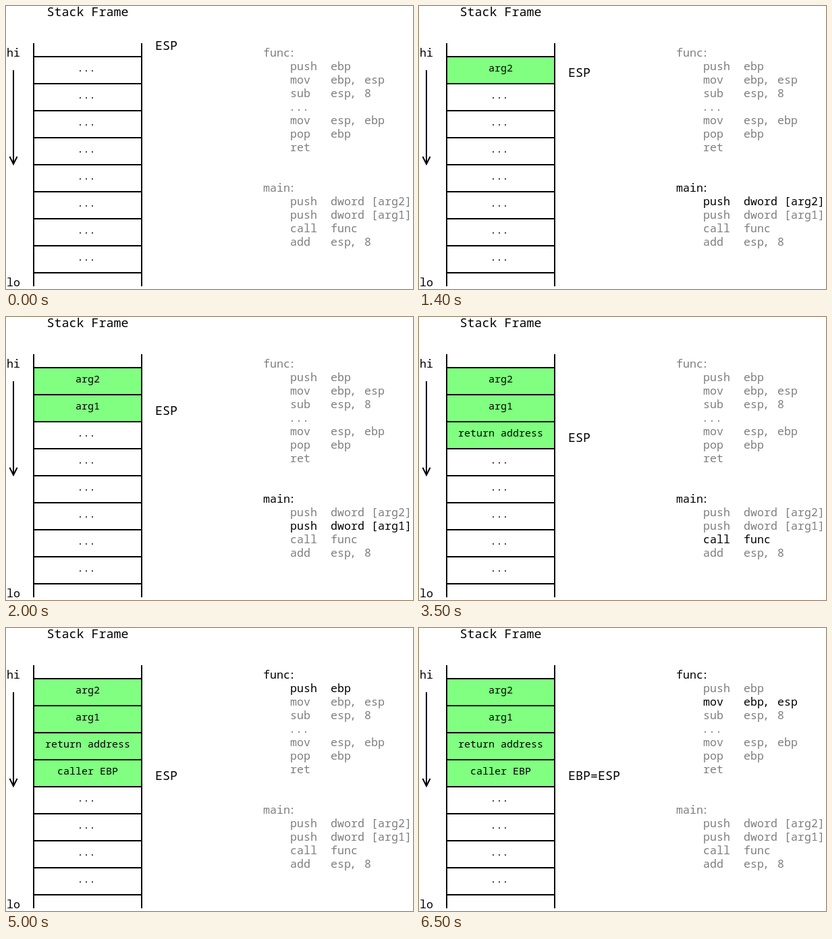
Recreate the animation shown at these times as an HTML page. Size 603 px wide and 419 px high, loop 8 s.

```html
<!DOCTYPE html>
<html lang="en">
<head>
<meta charset="utf-8">
<title>Stack frame</title>
<style>
html, body { margin: 0; width: 100%; height: 100%; overflow: hidden; background: #fff; }
svg { display: block; width: 603px; height: 419px; }
text { font-family: "Noto Sans Mono", "DejaVu Sans Mono", monospace; white-space: pre; }
path { fill: none; stroke: #000; stroke-width: 2; }
</style>
</head>
<body>
<svg viewBox="0 0 603 419"></svg>
<script>
const svg = document.querySelector("svg");
const LOOP = 8000, ROW = 40, GRAY = "#7f7f7f", GREEN = "#80ff80";

const listing = {
  func: { y: 75, lines: ["push  ebp", "mov   ebp, esp", "sub   esp, 8", "...",
                         "mov   esp, ebp", "pop   ebp", "ret"] },
  main: { y: 275, lines: ["push  dword [arg2]", "push  dword [arg1]",
                          "call  func", "add   esp, 8"] }
};
const values = ["arg2", "arg1", "return address", "caller EBP"];

const steps = [
  { at: 0,    used: 0, pointer: "ESP" },
  { at: 500,  used: 1, pointer: "ESP", block: "main", line: 0 },
  { at: 2000, used: 2, pointer: "ESP", block: "main", line: 1 },
  { at: 3500, used: 3, pointer: "ESP", block: "main", line: 2 },
  { at: 5000, used: 4, pointer: "ESP", block: "func", line: 0 },
  { at: 6500, used: 4, pointer: "EBP=ESP", block: "func", line: 1 }
];

function add(tag, attrs) {
  const el = document.createElementNS("http://www.w3.org/2000/svg", tag);
  for (const key in attrs) el.setAttribute(key, attrs[key]);
  return svg.appendChild(el);
}

// Monospace grid; dots, colons and commas sit slightly left in their cells.
function write(el, str, x, y, pitch) {
  el.textContent = str;
  el.setAttribute("x", [...str].map((c, i) => x + i * pitch - (/[.:,]/.test(c) ? 2 : 0)).join(" "));
  el.setAttribute("y", y);
}

function label(str, x, y, pitch, fill = "#000") {
  const el = add("text", { "font-size": pitch / 0.6, fill });
  write(el, str, x, y, pitch);
  return el;
}

const cells = Array.from({ length: 8 }, (_, i) => ({
  box: add("rect", { x: 41, y: 75 + i * ROW, width: 160, height: ROW, fill: "none" }),
  text: label("...", 0, 0, 9)
}));

let grid = "M41 55V415M201 55V415";
for (let y = 75; y <= 395; y += ROW) grid += `M41 ${y}H201`;
add("path", { d: grid });
add("path", { d: "M11 95V234M5.5 223L11 234L16.5 223" });

label("Stack Frame", 60.5, 15, 11);
label("hi", 1, 75, 10);
label("lo", 1, 415, 10);
const pointer = label("ESP", 221, 65, 11);

const code = {};
for (const [name, { y, lines }] of Object.entries(listing)) {
  code[name] = {
    title: label(name + ":", 381, y, 10, GRAY),
    lines: lines.map((s, i) => label(s, 421, y + 20 * (i + 1), 10, GRAY))
  };
}

function show(step) {
  cells.forEach(({ box, text }, i) => {
    const full = i < step.used, str = full ? values[i] : "...";
    box.setAttribute("fill", full ? GREEN : "none");
    write(text, str, 121 - str.length * 4.5, 97 + i * ROW, 9);
  });
  write(pointer, step.pointer, 221, 65 + step.used * ROW, 11);
  for (const name in code) {
    const active = name === step.block;
    code[name].title.setAttribute("fill", active ? "#000" : GRAY);
    code[name].lines.forEach((el, i) =>
      el.setAttribute("fill", active && i === step.line ? "#000" : GRAY));
  }
}

const start = performance.now();
let current;
function tick() {
  const t = (performance.now() - start) % LOOP;
  const step = steps.filter(s => s.at <= t).pop();
  if (step !== current) show(current = step);
  requestAnimationFrame(tick);
}
tick();
</script>
</body>
</html>
```
